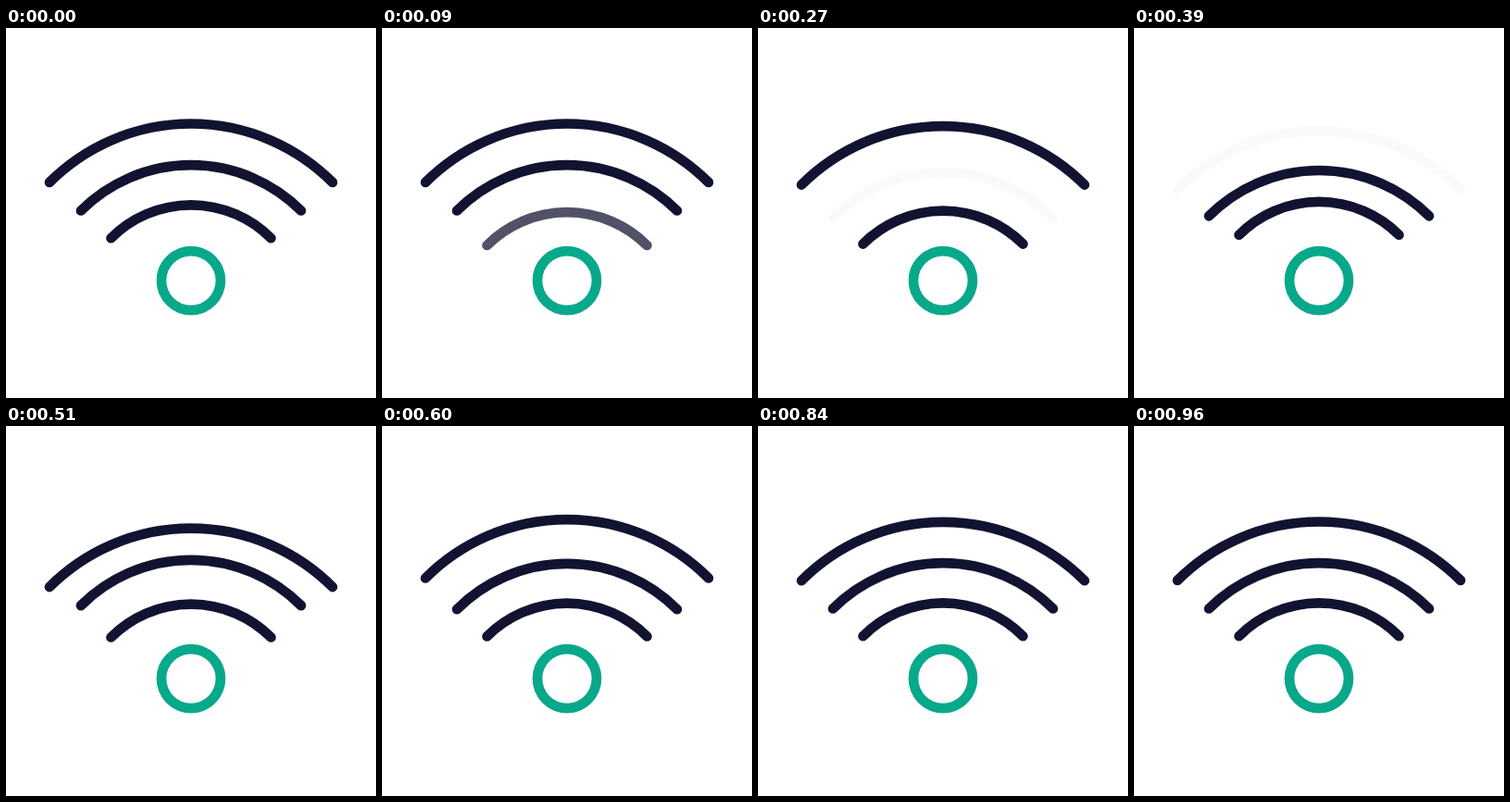
An HTML page with a canvas for the animation above (2020 ms loop, 400 by 400 pixels).

```html
<!DOCTYPE html>
<html lang="en">
<head>
<meta charset="utf-8">
<title>Wireless signal</title>
<style>
  html, body { margin: 0; width: 100%; height: 100%; overflow: hidden; background: #fff; }
  canvas { display: block; width: 100vw; height: 100vh; }
</style>
</head>
<body>
<canvas id="stage" width="400" height="400"></canvas>
<script>
const ctx = document.getElementById('stage').getContext('2d');
const LOOP = 2020, STEP = 30, MOVE_END = 960;
const DROP = 7.8;        // how far a wave sinks, px
const SINK = 90;         // sinking time, ms
const RELEASE = 250;     // when the spring lets go, ms
const SPRING = 470;      // spring time, ms

const waves = [
  { r: 122.3, top: 191.4, delay: 0 },
  { r: 168.3, top: 148.2, delay: 115 },
  { r: 216.4, top: 103.5, delay: 250 }
];

const clamp = v => Math.min(1, Math.max(0, v));

function offset(t) {
  if (t < RELEASE) return DROP * Math.sin(clamp(t / SINK) * Math.PI / 2);
  const s = t - RELEASE;
  const taper = 1 - clamp(s / SPRING) ** 4;
  return DROP * Math.exp(-s * 0.0057) * Math.cos(Math.PI * s / 145) * taper;
}

function opacity(t) {
  const out = (1 - clamp((t - 80) / 70)) ** 2;
  const back = clamp((t - 150) / 100) ** 2.7;
  return Math.max(0.02, out, back);
}

function arc(x, y, r, from, to, color) {
  ctx.strokeStyle = color;
  ctx.beginPath();
  ctx.arc(x, y, r, from, to);
  ctx.stroke();
}

function draw(time) {
  ctx.globalAlpha = 1;
  ctx.fillStyle = '#fff';
  ctx.fillRect(0, 0, 400, 400);
  ctx.lineWidth = 10.7;
  ctx.lineCap = 'round';
  arc(200, 273.1, 32, 0, Math.PI * 2, '#08a88a');
  for (const { r, top, delay } of waves) {
    const t = time >= MOVE_END ? 0 : Math.max(0, time - delay);
    ctx.globalAlpha = opacity(t);
    arc(200, top + r + offset(t), r, -Math.PI * 0.75, -Math.PI * 0.25, '#121331');
  }
}

const start = performance.now();
function tick() {
  const t = (performance.now() - start) % LOOP;
  draw(Math.floor(t / STEP) * STEP);
  requestAnimationFrame(tick);
}
tick();
</script>
</body>
</html>
```
